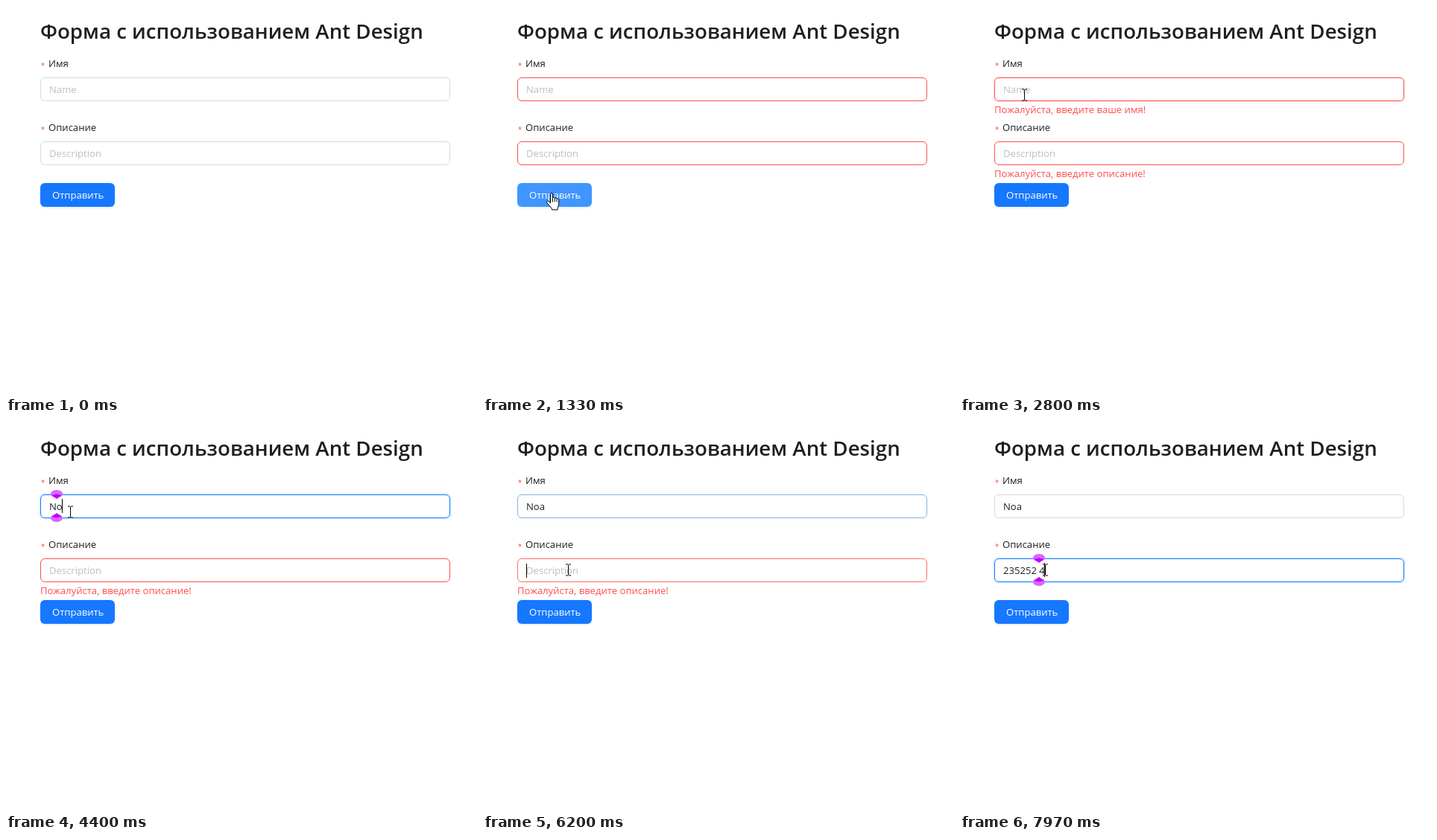
Recreate the animation shown at these times as an HTML page. Size 632 by 523 pixels, loop 8000 ms.

```html
<!DOCTYPE html>
<html lang="ru">
<head>
<meta charset="utf-8">
<title>Форма</title>
<style>
  html, body { margin: 0; width: 100%; height: 100%; overflow: hidden; background: #fff; }
  svg { display: block; }
  text { font: 13.1px "Open Sans", sans-serif; fill: #1f1f1f; white-space: pre; }
  .title { font-size: 27.7px; font-weight: 600; }
  .star { font: 12px "Liberation Mono", monospace; }
  .star, .error { fill: #ff4d4f; }
  .placeholder { fill: #bfbfbf; }
  .submit { fill: #fff; }
  .pointer path { fill: #fff; stroke: #000; stroke-linejoin: round; }
</style>
</head>
<body>
<svg width="632" height="523" viewBox="0 0 632 523">
  <text class="title" x="46" y="44">Форма с использованием Ant Design</text>
  <g id="fields"></g>
  <rect x="46" y="240" width="100" height="32" rx="6" fill="#e6f4ff"/>
  <rect id="button" x="46" y="238" width="100" height="32" rx="6"/>
  <text class="submit" x="62" y="259">Отправить</text>
  <g id="cursor" class="pointer">
    <path id="arrow" d="M.5 .5V16.5L4.3 13L6.8 18.8L9 17.8L6.5 12.2H11.6Z"/>
    <g id="hand">
      <path d="M.5 14V2a1.5 1.5 0 0 1 3 0V7.5a1.4 1.4 0 0 1 2.8 0V8a1.4 1.4 0 0 1 2.8 .3V9a1.3 1.3 0 0 1 2.6 .2V14.5C11.7 18 10 19 10 23H2.5C2.5 20-1 17.5-4 14c-1-1.3-.6-2.8 .8-2.8 1.2 0 2.4 1.2 3.7 2.8Z"/>
      <path d="M3.5 7.5v5M6.3 8v4.5M9.1 9v3.5"/>
    </g>
    <path id="beam" d="M-3.5-7.5h3m1 0h3M0-7V7M-3.5 7.5h3m1 0h3"/>
  </g>
</svg>
<script>
const LOOP = 8000, MARKER_LAG = 50, TEXT_X = 58;
const GREY = [217, 217, 217, 1], RED = [255, 77, 79, 1], SOFT_RED = [255, 163, 158, 1];
const BLUE = [22, 119, 255, 1], LIGHT_BLUE = [64, 150, 255, 1], DARK_BLUE = [9, 88, 217, 1];
const RED_GLOW = [255, 38, 5, .08], BLUE_GLOW = [5, 145, 255, .12], NO_GLOW = [255, 255, 255, 0];

const fields = [
  {
    y: 96, label: 'Имя', hint: 'Name', error: 'Пожалуйста, введите ваше имя!',
    focus: 2300, blur: 6130, valid: 3700,
    keys: [[3700, 'N'], [4370, 'o'], [4520, 'a']],
    caretOff: [[2800, 3300], [4270, 4370], [5070, 5570]],
    border: [[1140, RED], [2010, SOFT_RED], [2300, RED], [3700, BLUE], [6130, GREY]],
    glow: [[2300, RED_GLOW], [3700, BLUE_GLOW], [6130, NO_GLOW]]
  },
  {
    y: 182, label: 'Описание', hint: 'Description', error: 'Пожалуйста, введите описание!',
    focus: 6130, blur: LOOP, valid: 6830,
    keys: [[6830, '2'], [6870, '3'], [6930, '5'], [7070, '2'], [7200, '5'], [7270, '2'], [7630, ' '], [7970, '4']],
    caretOff: [[6630, 6830]],
    border: [[1140, RED], [5670, SOFT_RED], [6130, RED], [6830, BLUE]],
    glow: [[6130, RED_GLOW], [6830, BLUE_GLOW]]
  }
];
const buttonColors = [[500, LIGHT_BLUE], [1080, DARK_BLUE], [1150, LIGHT_BLUE], [1820, BLUE]];
// Hot spot of the pointer: time, x, y
const path = [
  [130, 355, 409], [570, 88, 242], [730, 88, 242], [830, 90, 251], [1700, 90, 251],
  [2100, 86.5, 119.5], [5360, 86.5, 119.5], [5400, 94.5, 115.5], [5560, 94.5, 115.5],
  [5670, 123.5, 191.5], [5830, 114.5, 197.5]
];

const $ = id => document.getElementById(id);
const clamp = p => p < 0 ? 0 : p > 1 ? 1 : p;
const easeOut = p => 1 - (1 - clamp(p)) ** 2;
const smooth = p => (p = clamp(p)) * p * (3 - 2 * p);
const mix = (a, b, p) => a + (b - a) * p;
const show = (node, on) => node.setAttribute('visibility', on ? 'visible' : 'hidden');

function colorAt(t, start, steps) {
  const color = steps.reduce((from, [at, to]) =>
    from.map((v, i) => mix(v, to[i], easeOut((t - at) / 200))), start);
  return `rgba(${color})`;
}

function pointerAt(t) {
  const next = path.findIndex(key => key[0] > t);
  if (next < 1) return path.at(next).slice(1);
  const [t0, x0, y0] = path[next - 1], [t1, x1, y1] = path[next];
  const p = smooth((t - t0) / (t1 - t0));
  return [mix(x0, x1, p), mix(y0, y1, p)];
}

const typed = (field, t) => field.keys.filter(([at]) => at <= t).map(key => key[1]).join('');

const half = `<ellipse cy="-16.3" rx="8" ry="5.2" fill="#d966ff"/>
  <path d="M-6.5-14.5L0-16L6.5-14.5L0-9.5Z" fill="#bf00ff"/>`;

$('fields').innerHTML = fields.map(({ y, label, hint, error }) => `
  <g transform="translate(0 ${y})">
    <text class="star" x="46" y="-11">*</text>
    <text x="57" y="-14">${label}</text>
    <rect class="glow" x="45" y="-1" width="552" height="34" rx="7" fill="none" stroke-width="2"/>
    <rect class="border" x="46.5" y=".5" width="549" height="31" rx="5.5" fill="#fff"/>
    <text class="placeholder" x="${TEXT_X}" y="21">${hint}</text>
    <text class="value" x="${TEXT_X}" y="21"></text>
    <g class="marker">${half}<g transform="scale(1 -1)">${half}</g></g>
    <rect class="caret" width="1" height="19"/>
    <text class="error" x="46" y="48">${error}</text>
  </g>`).join('');
fields.forEach((field, i) => {
  const group = $('fields').children[i];
  field.part = name => group.querySelector('.' + name);
});

function drawField(field, t) {
  const { part } = field;
  const text = typed(field, t), marked = typed(field, t - MARKER_LAG).length;
  const focused = t >= field.focus && t < field.blur;
  const value = part('value'), caret = part('caret'), marker = part('marker'), error = part('error');

  part('border').setAttribute('stroke', colorAt(t, GREY, field.border));
  part('glow').setAttribute('stroke', colorAt(t, NO_GLOW, field.glow));
  if (value.textContent !== text) value.textContent = text;
  show(part('placeholder'), !text);

  const widthOf = count => count ? value.getSubStringLength(0, count) : 0;
  caret.setAttribute('x', Math.floor(TEXT_X + widthOf(text.length)));
  caret.setAttribute('y', text ? 6 : 7);
  show(caret, focused && !field.caretOff.some(([from, to]) => t >= from && t < to));
  marker.setAttribute('transform', `translate(${Math.round(TEXT_X + widthOf(marked))} 15.5)`);
  show(marker, focused && marked);

  const shown = smooth((t - 1330) / 170) * (1 - smooth((t - field.valid) / 250));
  error.setAttribute('opacity', shown);
  error.setAttribute('transform', `translate(0 ${-4 * (1 - shown)})`);
}

function drawPointer(t) {
  const [x, y] = pointerAt(t);
  const onButton = y >= 238 && y < 270 && x < 146;
  const onField = x < 146 && fields.some(field => y >= field.y && y < field.y + 32);
  const snap = onField ? v => Math.floor(v) + .5 : Math.round;
  $('cursor').setAttribute('transform', `translate(${snap(x)} ${snap(y)})`);
  const visible = t >= 130;
  show($('hand'), visible && onButton);
  show($('beam'), visible && onField);
  show($('arrow'), visible && !onButton && !onField);
}

function draw() {
  const t = performance.now() % LOOP;
  fields.forEach(field => drawField(field, t));
  $('button').setAttribute('fill', colorAt(t, BLUE, buttonColors));
  drawPointer(t);
  requestAnimationFrame(draw);
}
draw();
</script>
</body>
</html>
```
